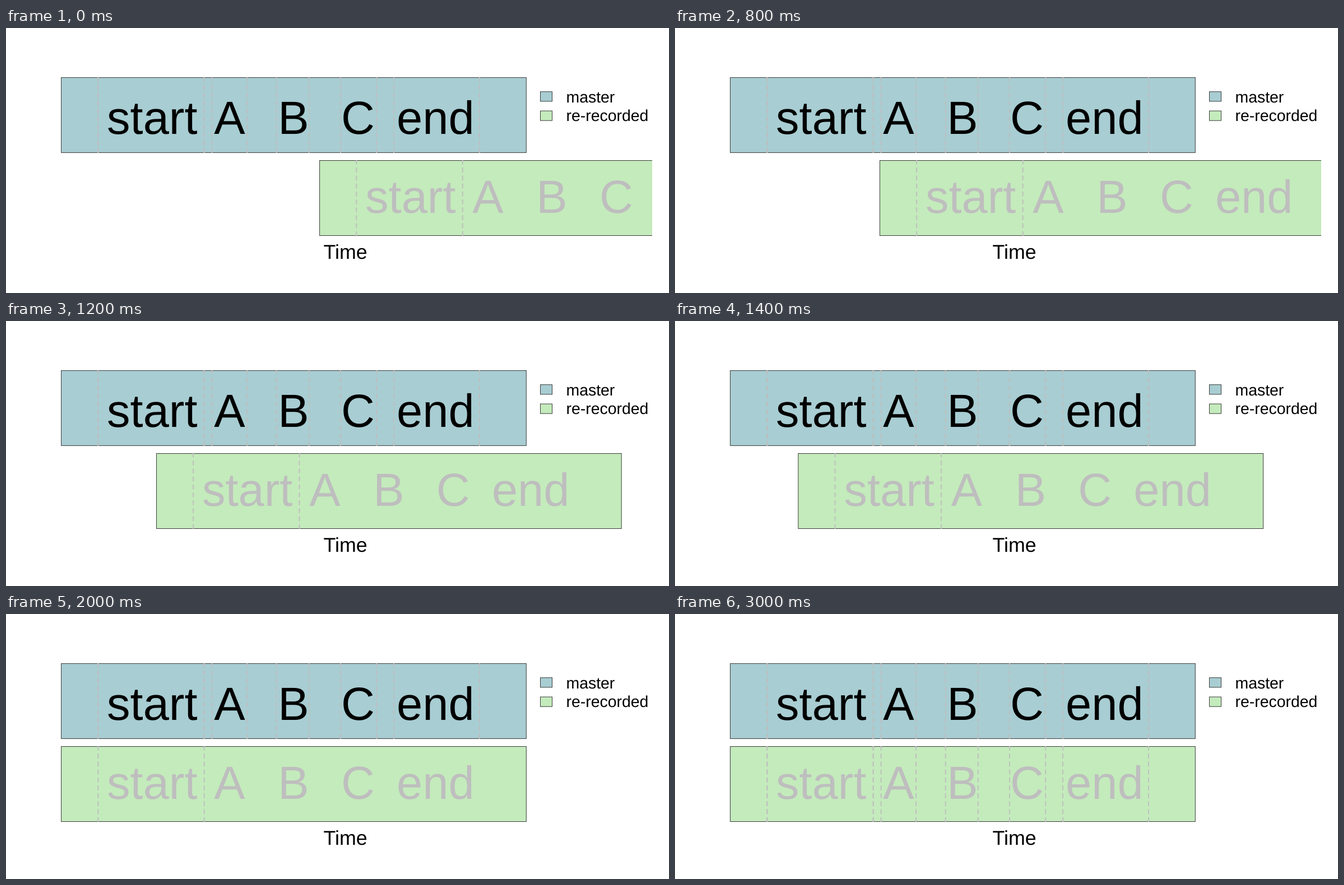
Write an HTML page with a canvas that moves like this. It is 1183 px wide and 473 px high and loops after 4000 ms.

```html
<!DOCTYPE html>
<html lang="en">
<head>
<meta charset="utf-8">
<title>Aligning a re-recorded track</title>
<style>
  html, body { margin: 0; width: 100%; height: 100%; overflow: hidden; background: #fff; }
  canvas { display: block; }
</style>
</head>
<body>
<canvas id="stage" width="1183" height="473"></canvas>
<script>
const ctx = document.getElementById('stage').getContext('2d');
const BLUE = '#a8cdd2', GREEN = '#c4ebbc', GRAY = '#bebebe', BLACK = '#000';
const LOOP = 4000, STEP = 100, SLIDE_STEPS = 19, SLIDE_DISTANCE = 461, MATCH_ALL = 3000;
const BAR = { left: 98.6, width: 829.7, height: 134 };
const CUTS = [164.3, 353.7, 367.7, 430, 482.7, 540.7, 597, 661.3, 692, 845];
const START_CUTS = CUTS.slice(0, 2);
const WORDS = [['start', 260.8], ['A', 399], ['B', 513], ['C', 628], ['end', 766.3]];

ctx.textRendering = 'geometricPrecision';

function box(x, y, w, h, fill) {
  ctx.fillStyle = fill;
  ctx.fillRect(x, y, w, h);
  ctx.strokeStyle = '#333';
  ctx.lineWidth = 0.95;
  ctx.strokeRect(x, y, w, h);
}

function label(text, x, y, size, align, color = BLACK) {
  ctx.font = `${size}px "Liberation Sans", Arial, sans-serif`;
  ctx.textAlign = align;
  ctx.fillStyle = color;
  ctx.fillText(text, x, y);
}

function dashedLines(cuts, top) {
  ctx.strokeStyle = GRAY;
  ctx.lineWidth = 1.9;
  ctx.lineCap = 'round';
  ctx.setLineDash([7.1, 7.1]);
  ctx.beginPath();
  for (const x of cuts) {
    ctx.moveTo(x, top + BAR.height);
    ctx.lineTo(x, top);
  }
  ctx.stroke();
}

function track(shift, top, baseline, fill, textColor, showAllCuts) {
  ctx.save();
  ctx.beginPath();
  ctx.rect(0, 0, 1153, 473);
  ctx.clip();
  ctx.translate(shift, 0);
  box(BAR.left, top, BAR.width, BAR.height, fill);
  dashedLines(START_CUTS, top);
  if (showAllCuts) dashedLines(CUTS, top);
  for (const [word, x] of WORDS) label(word, x, baseline, 83, 'center', textColor);
  ctx.restore();
}

function draw(time) {
  const step = Math.min(Math.floor(time / STEP), SLIDE_STEPS);
  const shift = SLIDE_DISTANCE * (1 - step / SLIDE_STEPS);
  ctx.fillStyle = '#fff';
  ctx.fillRect(0, 0, 1183, 473);

  track(0, 88.4, 188.6, BLUE, BLACK, true);
  track(shift, 236.5, 329.6, GREEN, GRAY, time >= MATCH_ALL);

  box(953.5, 113.7, 21, 17.2, BLUE);
  label('master', 999.5, 133, 28.4, 'left');
  box(953.5, 148, 21, 17.2, GREEN);
  label('re-recorded', 999.5, 166.4, 28.4, 'left');
  label('Time', 605.5, 412, 35.8, 'center');
}

const start = performance.now();
function tick() {
  draw((performance.now() - start) % LOOP);
  requestAnimationFrame(tick);
}
tick();
</script>
</body>
</html>
```
